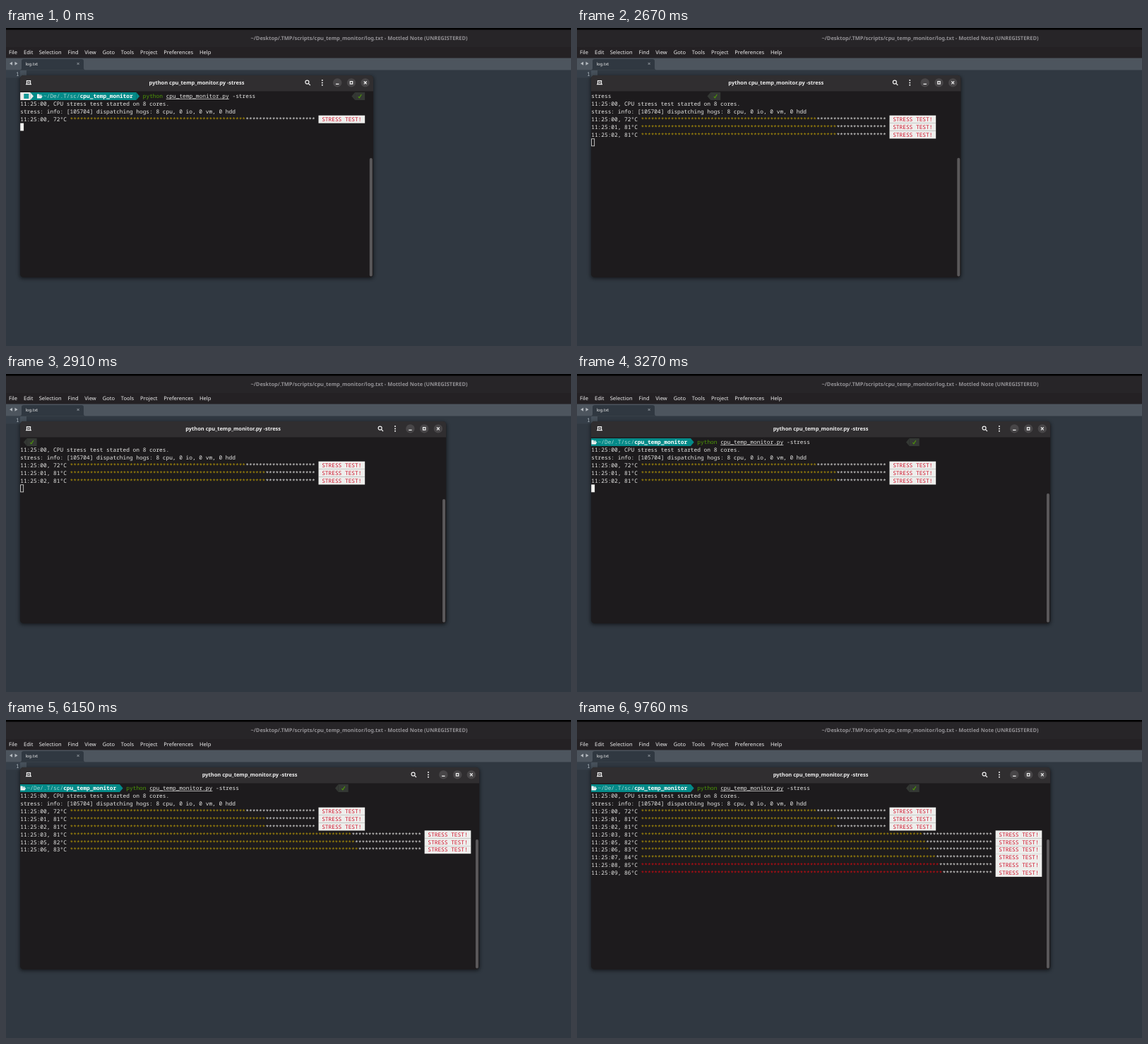
These frames come from a looping animation (800x450 px, 10000 ms). An HTML page:

```html
<!DOCTYPE html>
<html lang="en">
<head>
<meta charset="utf-8">
<title>CPU stress test</title>
<style>
html, body { margin: 0; width: 100%; height: 100%; overflow: hidden; background: #303841; }
svg { display: block; width: 100vw; height: 100vh; }
text { white-space: pre; text-rendering: geometricPrecision; font: 7.5px "Noto Sans", sans-serif; fill: #eeeeee; }
.title { font-weight: 700; font-size: 7.47px; text-anchor: middle; }
.mono text { font: 7.82px "Noto Sans Mono", monospace; fill: #e9e9e7; }
.mono .bold { font-weight: 700; fill: #fff; }
</style>
</head>
<body>
<svg id="stage" viewBox="0 0 800 450">
  <defs>
    <filter id="blur" x="-10%" y="-10%" width="120%" height="120%"><feGaussianBlur stdDeviation="2.5"/></filter>
    <clipPath id="view"><rect x="20" y="89" width="780" height="264"/></clipPath>
  </defs>

  <!-- editor -->
  <rect width="800" height="450" fill="#303841"/>
  <rect width="800" height="43" fill="#242124"/>
  <rect y="2" width="800" height="25" fill="#272528"/>
  <rect width="800" height="2.5" fill="#000"/>
  <text class="title" x="500" y="17" style="fill:#929094">~/Desktop/.TMP/scripts/cpu_temp_monitor/log.txt - Mottled Note (UNREGISTERED)</text>
  <g id="menu"></g>
  <rect y="42.5" width="800" height="17" fill="#4d555e"/>
  <path d="M9 47.8v5l-4-2.5zM12.5 47.8v5l4-2.5z" fill="#b5babf"/>
  <path d="M19 59.5q3 0 3-3V47q0-3 3-3h82q3 0 3 3v9.500q0 3 3 3z" fill="#303841"/>
  <text x="27.500" y="52.900" style="font-size:5.9px">log.txt</text>
  <path d="M100.600 49l3 3m0-3l-3 3" stroke="#a9afb5" stroke-width=".8"/>
  <rect y="60" width="20" height="10.500" fill="#363f49"/>
  <rect x="20" y="60" width="9" height="10.500" fill="#46505a"/>
  <g class="mono"><text x="14" y="68.300" style="fill:#aab4bd">1</text></g>

  <!-- terminal -->
  <rect id="shadow" x="19" y="68" height="287" rx="5" fill="#000" opacity=".5" filter="url(#blur)"/>
  <rect id="body" x="20" y="67" height="286" rx="5" fill="#1d1b1d"/>
  <path id="bar" fill="#302e30"/>
  <path d="M29.500 79v-4.300h5V79M28 79.700h8" fill="none" stroke="#eee" stroke-width="1.300"/>
  <path d="M32 75.800v2.600m-1.300-1.300h2.600" stroke="#eee" stroke-width=".8"/>
  <text id="name" class="title" y="80">python cpu_temp_monitor.py -stress</text>
  <g id="buttons" fill="none" stroke="#f0f0f0" stroke-width="1.200">
    <circle cx="-93.600" cy="76.600" r="2.500"/>
    <path d="M-91.800 78.400l2.600 2.600"/>
    <g fill="#f0f0f0" stroke="none">
      <circle cx="-72.200" cy="74" r="1"/><circle cx="-72.200" cy="77.400" r="1"/><circle cx="-72.200" cy="80.800" r="1"/>
    </g>
    <g fill="#484648" stroke="none">
      <circle cx="-50.800" cy="77.400" r="6.200"/><circle cx="-31" cy="77.400" r="6.200"/><circle cx="-11.300" cy="77.400" r="6.200"/>
    </g>
    <path d="M-53 79.300h4.400M-32.700 75.700h3.400v3.400h-3.400zM-13.200 75.500l3.800 3.800m0-3.800l-3.800 3.800"/>
  </g>
  <rect id="thumb" width="4" rx="2" fill="#5a585a"/>
  <g class="mono" clip-path="url(#view)">
    <g id="prompt"></g>
    <g id="log"></g>
    <rect id="cursor" x="20.200"/>
  </g>
</svg>
<script>
const LOOP = 10000, CW = 4.692, CH = 10.9, LEFT = 20.2, TOP = 91;
const $ = id => document.getElementById(id);
const col = c => LEFT + c * CW;
const row = r => TOP + r * CH;

function add(parent, tag, attrs, content) {
  const el = document.createElementNS("http://www.w3.org/2000/svg", tag);
  set(el, attrs);
  if (content) el.textContent = content;
  return parent.appendChild(el);
}
function set(el, attrs) {
  for (const k in attrs) el.setAttribute(k, attrs[k]);
}
function write(parent, c, r, str, fill, cls = "") {
  return add(parent, "text", { x: col(c), y: row(r) + 8.2, class: cls, style: fill ? `fill:${fill}` : "" }, str);
}
function cells(parent, c, r, n, fill) {
  return add(parent, "rect", { x: col(c), y: row(r), width: n * CW, height: CH + 0.1, fill });
}

// Menu
const MENU = { File: 4, Edit: 25, Selection: 46.7, Find: 87.5, View: 111.3, Goto: 136.7,
  Tools: 162.8, Project: 190, Preferences: 223.3, Help: 274 };
for (const item in MENU) add($("menu"), "text", { x: MENU[item], y: 37.3 }, item);

// Shell prompt on row 0
const TEAL = "#048a88", PALE = "#eeeeec", SLATE = "#343834", prompt = $("prompt");
const arrow = (c, dir, fill) => {
  const from = dir > 0 ? col(c) : col(c + 1);
  add(prompt, "path", { d: `M${from} ${TOP}l${dir * CW} ${CH / 2}l${-dir * CW} ${CH / 2}z`, fill });
};
cells(prompt, 0, 0, 3.02, PALE);
add(prompt, "rect", { x: 25.3, y: 93, width: 7, height: 7, fill: "#159a98" });
cells(prompt, 3, 0, 32.02, TEAL);
arrow(3, 1, PALE);
arrow(35, 1, TEAL);
add(prompt, "path", { d: "M44 99.500v-6h2.500l.8 1h3.200v1.300h-4.300zl1.800-3.200h6l-1.800 3.200z", fill: "#f4f4f4" });
write(prompt, 7, 0, "~/De/.T/sc/", "#a9d4d2");
write(prompt, 18, 0, "cpu_temp_monitor", "", "bold");
write(prompt, 37, 0, "python", "#4e9a06");
write(prompt, 44, 0, "cpu_temp_monitor.py");
add(prompt, "rect", { x: col(44), y: TOP + 9.2, width: 19 * CW, height: 0.7, fill: "#e9e9e7" });
write(prompt, 64, 0, "-stress");
arrow(100, -1, SLATE);
cells(prompt, 101, 0, 3, SLATE);
add(prompt, "path", { d: `M${col(102)} 97l1.500 1.800l3-4.800`, fill: "none", stroke: "#4e9a06", "stroke-width": 1.1 });

// Readings: print time, clock second, temperature, bar length
const READINGS = [
  [0, 0, 72, 74], [970, 1, 81, 74], [2130, 2, 81, 74], [3300, 3, 81, 106], [4420, 5, 82, 106],
  [5580, 6, 83, 106], [6640, 7, 84, 106], [7820, 8, 85, 106], [9030, 9, 86, 106]
];
const log = $("log");
write(log, 0, 1, "11:25:00, CPU stress test started on 8 cores.");
write(log, 0, 2, "stress: info: [105704] dispatching hogs: 8 cpu, 0 io, 0 vm, 0 hdd");
const lines = READINGS.map(([at, sec, temp, len], i) => {
  const r = i + 3, g = add(log, "g", {}), hot = Math.floor(len * temp / 100);
  write(g, 0, r, `11:25:0${sec}, ${temp}°C`);
  write(g, 15, r, "*".repeat(hot), temp < 85 ? "#b89a08" : "#d00a12");
  write(g, 15 + hot, r, "*".repeat(len - hot));
  cells(g, 16 + len, r, 14, PALE);
  write(g, 17 + len, r, "STRESS TEST!", "#d0142c");
  return { at, g };
});

const BLINKS = [180, 760, 1390, 1970, 2580, 3180, 3760, 4360, 4940, 5550, 6150, 6750, 7360, 7960, 8550, 9150, 9760];
const DRAG_START = 2600, DRAG_END = 3240;

// Terminal width in columns while the edge is dragged
function columns(t) {
  if (t < DRAG_START) return 104;
  if (t < 2670) return 104 + Math.round(5 * (t - 2580) / 90);
  if (t < 2820) return 109 + Math.round(11 * (t - 2670) / 150);
  const u = Math.min(1, (t - 2820) / (DRAG_END - 2820));
  return 120 + Math.round(16 * (1 - (1 - u) ** 2));
}

// Columns of the prompt that rewrapping has pushed off the top
function wrapped(cols) {
  if (cols === 104) return 0;
  return cols < 129 ? 2 * cols - 153 : Math.max(0, cols - 131);
}

function render(t) {
  const cols = columns(t), grown = cols - 104, width = 500 + grown * CW, right = 20 + width;
  set($("shadow"), { width: width + 2 });
  set($("body"), { width });
  set($("bar"), { d: `M20 89.500V72q0-5 5-5H${right - 5}q5 0 5 5v17.500z` });
  set($("name"), { x: 20 + width / 2 });
  set($("buttons"), { transform: `translate(${right} 0)` });
  const thumbTop = 184 - 15 * (grown / 32) ** 2;
  set($("thumb"), { x: right - 5.2, y: thumbTop, height: 351.5 - thumbTop });
  set(prompt, { transform: `translate(${-wrapped(cols) * CW} 0)` });

  let shown = 0;
  for (const { at, g } of lines) {
    const on = t >= at;
    set(g, { visibility: on ? "visible" : "hidden" });
    shown += on;
  }

  const dragging = t >= DRAG_START && t < DRAG_END;
  const lit = BLINKS.filter(b => t >= b).length % 2 === 0;
  const inset = dragging ? 0.4 : 0;
  set($("cursor"), {
    x: LEFT + inset, y: row(shown + 3) + inset, width: CW + 0.2 - 2 * inset, height: CH - 2 * inset,
    fill: dragging ? "none" : "#f2f2f0", stroke: dragging ? "#e6e6e4" : "none", "stroke-width": 0.8,
    visibility: dragging || lit ? "visible" : "hidden"
  });
}

const start = performance.now();
function tick() {
  render((performance.now() - start) % LOOP);
  requestAnimationFrame(tick);
}
tick();
</script>
</body>
</html>
```
